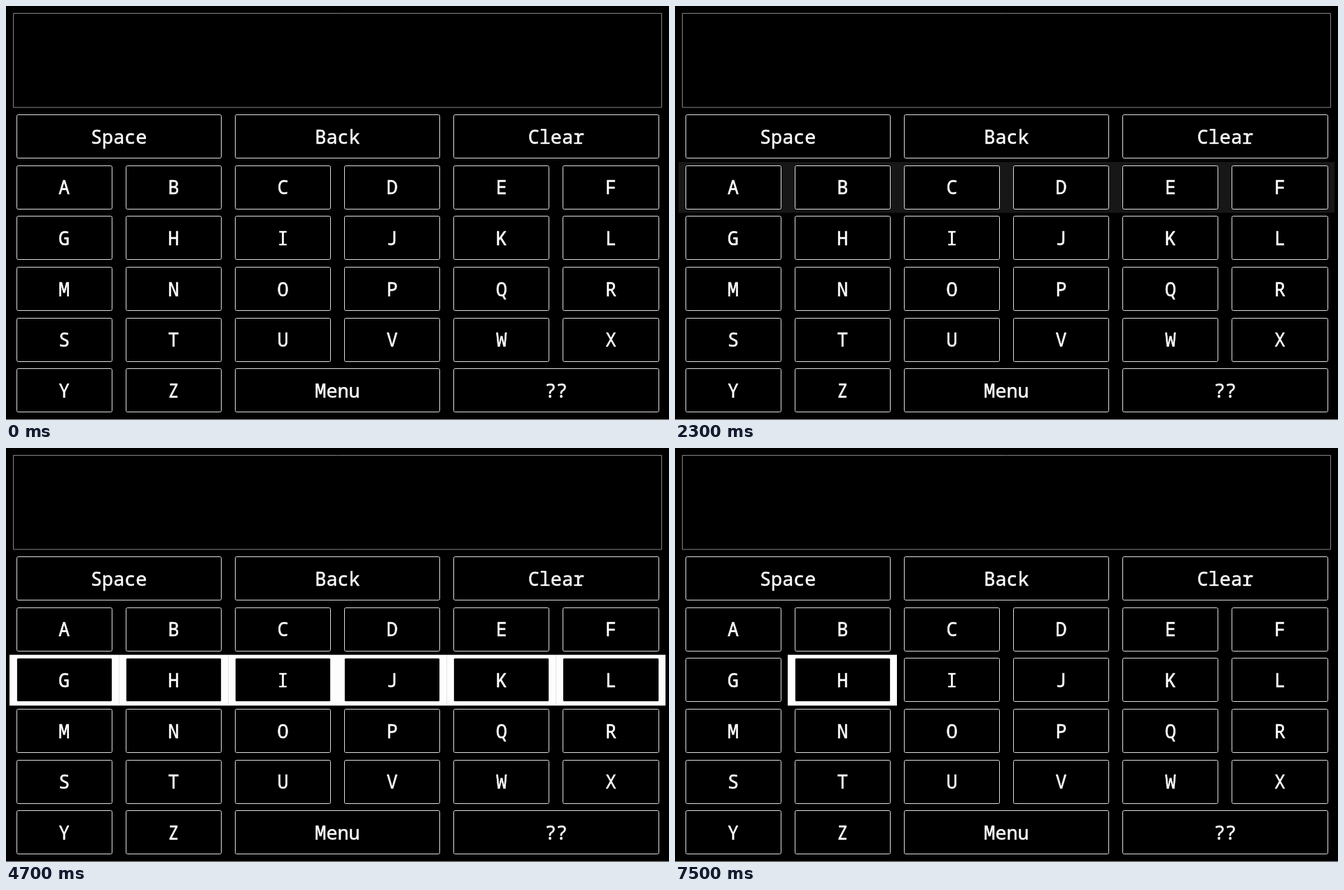
An HTML page with a canvas that plays this animation: 947 by 592 pixels, repeating every 8 s.

```html
<!DOCTYPE html>
<html lang="en">
<head>
<meta charset="utf-8">
<title>Scanning keyboard</title>
<style>
  html, body { margin: 0; width: 100%; height: 100%; overflow: hidden; background: #000; }
  canvas { display: block; width: 100vw; height: 100vh; }
</style>
</head>
<body>
<canvas id="stage" width="947" height="592"></canvas>
<script>
const ctx = document.getElementById('stage').getContext('2d');
const LOOP = 8000, TICK = 100, FADE = 500;
const LEFT = 5, TOP = 150.4, COL = 156.17, ROW = 72.65;

const rows = [
  ['Space', 'Back', 'Clear'],
  [...'ABCDEF'], [...'GHIJKL'], [...'MNOPQR'], [...'STUVWX'],
  ['Y', 'Z', 'Menu', '??']
];

// Lay keys out on six columns; word keys span two.
const keys = rows.flatMap((labels, row) => {
  let col = 0;
  return labels.map(label => {
    const span = label.length > 1 ? 2 : 1;
    const key = { label, row, col, x: LEFT + col * COL, y: TOP + row * ROW, w: span * COL };
    col += span;
    return key;
  });
});

// Each scan step lights a whole row, or one column of it.
const scan = [
  { start: 300, row: 0 },
  { start: 2300, row: 1 },
  { start: 4300, row: 2 },
  { start: 5000, row: 2, col: 0 },
  { start: 7000, row: 2, col: 1 }
];

const bezier = (a, b, u) => 3 * a * u * (1 - u) ** 2 + 3 * b * u * u * (1 - u) + u ** 3;
const snap = v => Math.floor(v) + 0.5;

// cubic-bezier(.25, .1, .25, 1)
function ease(p) {
  if (p >= 1) return 1;
  let lo = 0, hi = 1;
  for (let i = 0; i < 24; i++) {
    const mid = (lo + hi) / 2;
    if (bezier(0.25, 0.25, mid) < p) lo = mid; else hi = mid;
  }
  return bezier(0.1, 1, lo);
}

function drawGlow(key, alpha) {
  ctx.fillStyle = `rgba(255,255,255,${alpha})`;
  const x = Math.round(key.x), end = Math.round(key.x + key.w);
  ctx.fillRect(x, key.y, end - x, ROW);
}

function drawSeam(key, alpha) {
  ctx.fillStyle = `rgba(0,0,0,${0.1 * alpha})`;
  ctx.fillRect(Math.floor(key.x), key.y, 1, ROW);
}

function drawKey({ label, x, y, w }) {
  const l = snap(x + 10), t = snap(y + 5);
  const r = snap(x + w - 10), b = snap(y + ROW - 5.4);
  ctx.beginPath();
  ctx.roundRect(l, t, r - l, b - t, 2);
  ctx.fillStyle = '#000';
  ctx.fill();
  ctx.lineWidth = 1;
  ctx.strokeStyle = '#dedede';
  ctx.stroke();

  // A thin outline gives the letters their medium weight.
  const baseline = y + ROW / 2 + 10;
  ctx.fillStyle = ctx.strokeStyle = '#fff';
  ctx.lineWidth = 0.5;
  ctx.fillText(label, x + w / 2, baseline);
  ctx.strokeText(label, x + w / 2, baseline);
}

function draw(t) {
  ctx.fillStyle = '#000';
  ctx.fillRect(0, 0, 947, 592);
  ctx.fillStyle = '#999';
  ctx.fillRect(0, 591, 947, 1);
  ctx.lineWidth = 1;
  ctx.strokeStyle = '#858585';
  ctx.strokeRect(10.5, 10.5, 926, 134.5);

  const step = scan.findLast(s => t >= s.start);
  if (step) {
    const age = Math.floor((t - step.start) / TICK) * TICK + 48;
    const alpha = ease(age / FADE);
    const lit = keys.filter(k => k.row === step.row && (step.col ?? k.col) === k.col);
    lit.forEach(k => drawGlow(k, alpha));
    lit.slice(1).filter(k => k.col !== 3).forEach(k => drawSeam(k, alpha));
  }

  ctx.font = '500 26.8px "Noto Sans Mono", "DejaVu Sans Mono", monospace';
  ctx.textAlign = 'center';
  ctx.textBaseline = 'alphabetic';
  ctx.lineJoin = 'round';
  keys.forEach(drawKey);
}

const origin = performance.now();
function frame() {
  draw((performance.now() - origin) % LOOP);
  requestAnimationFrame(frame);
}
frame();
</script>
</body>
</html>
```
